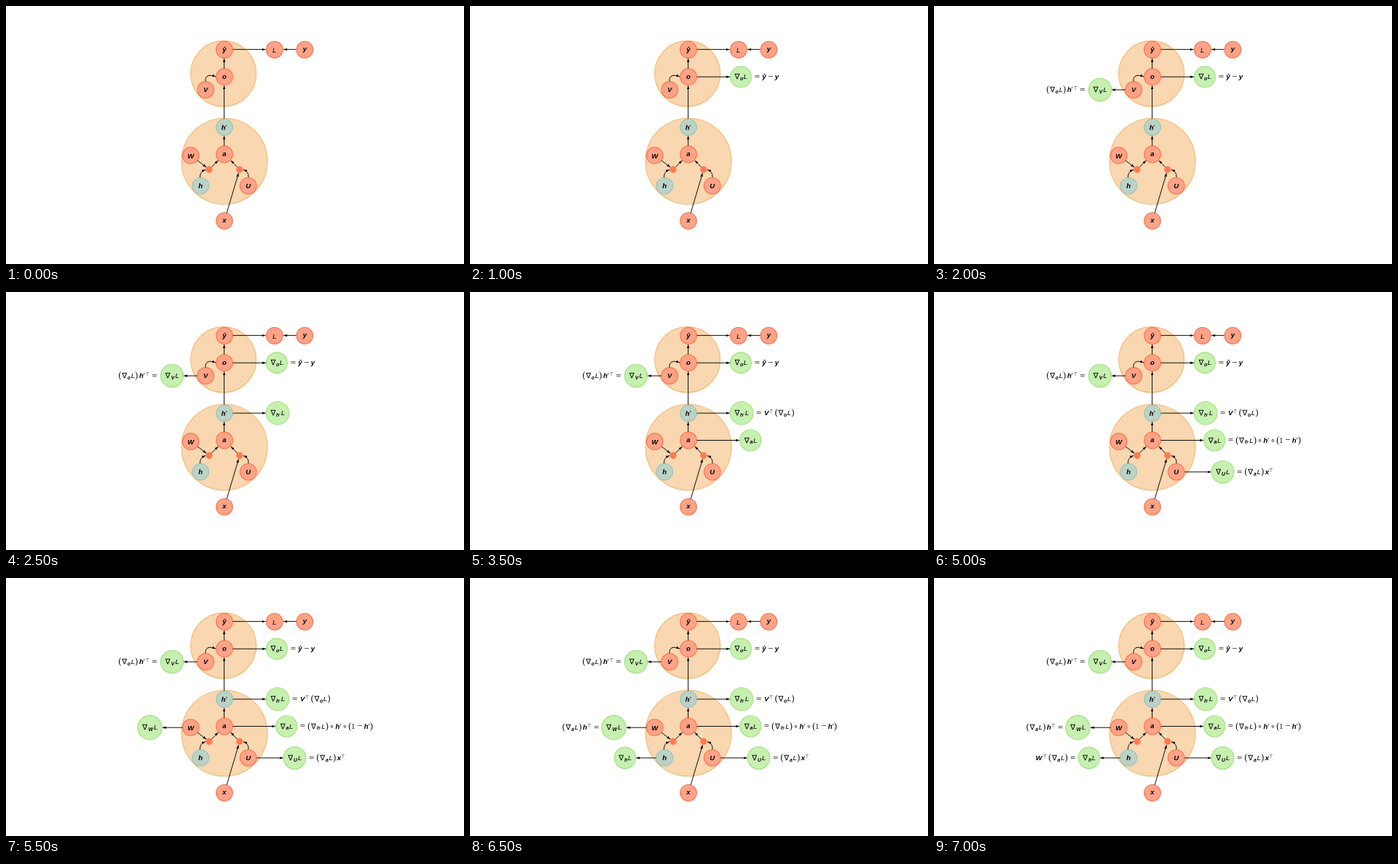
Write an HTML page that moves like this. It is 629 px wide and 354 px high and loops after 7.5 s.

```html
<!DOCTYPE html>
<html lang="en">
<head>
<meta charset="utf-8">
<title>Backpropagation graph</title>
<style>
html, body { margin: 0; height: 100%; overflow: hidden; background: #fff; }
svg { display: block; width: 629px; height: 354px; }
circle { stroke-width: 1.2; }
.cell { fill: #f9d7b0; stroke: #f3bd7c; }
.red { fill: #ffa388; stroke: #fb7850; }
.teal { fill: #bbd2c7; stroke: #a0c4b9; }
.green { fill: #c6f0b0; stroke: #a5e282; }
.dot { fill: #ff7a50; }
.arrow { fill: none; stroke: #000; stroke-width: .95; marker-end: url(#tip); }
text { text-anchor: middle; fill: #000; }
.bold { font: italic bold 9.5px "Liberation Sans", sans-serif; }
.light { font: italic 9.7px "Liberation Sans", sans-serif; }
.roman { font: 10.2px "Liberation Serif", serif; }
.paren { font: 11.6px "Liberation Serif", serif; }
.rel { font: 13px "Liberation Serif", serif; }
.sym { font: 10.3px "DejaVu Sans", sans-serif; }
.sup { font: 6.6px "DejaVu Sans", sans-serif; }
.sub { font-size: 6.9px; }
</style>
</head>
<body>
<svg id="stage" viewBox="0 0 629 354">
  <defs>
    <marker id="tip" markerUnits="userSpaceOnUse" markerWidth="6" markerHeight="4" refX="5" refY="2" orient="auto">
      <path d="M0 .2Q2.6 1.3 5.2 2Q2.6 2.7 0 3.8Z"/>
    </marker>
  </defs>
</svg>
<script>
const stage = document.getElementById('stage');
const EM = 10.2, STEP = 500, STEPS = 15;

// Glyph: [style, advance in em, baseline shift in px]
const glyphs = {
  '(': ['paren', .389, 0], ')': ['paren', .389, 0],
  '=': ['rel', .778, .7], '−': ['rel', .778, .7],
  '1': ['roman', .5, 0], '∇': ['sym', .833, 0], '∘': ['sym', .5, 0],
  '⊤': ['sup', .595, -3.2], '′': ['roman', .24, 0],
  L: ['light', .58, 0], V: ['bold', .73, 0], W: ['bold', 1.04, 0], U: ['bold', .74, 0],
  h: ['bold', .56, 0], a: ['bold', .525, 0], o: ['bold', .55, 0],
  x: ['bold', .5, 0], y: ['bold', .5, 0], 'ŷ': ['bold', .5, 0]
};
const spaces = { ' ': .278, '~': .222, ',': .167 };

// Sets a formula; braces hold a subscript. Returns its markup and width.
function typeset(src, x, y) {
  const start = x;
  let out = '', sub = false;
  for (const ch of src) {
    if (ch === '{') { sub = true; continue; }
    if (ch === '}') { sub = false; x += .05 * EM; continue; }
    if (ch in spaces) { x += spaces[ch] * EM; continue; }
    const [style, advance, shift] = glyphs[ch];
    const width = advance * EM * (sub ? .7 : 1);
    const cls = style + (sub ? ' sub' : '');
    out += `<text class="${cls}" x="${x + width / 2}" y="${y + shift + (sub ? 1.6 : 0)}">${ch}</text>`;
    x += width;
  }
  return { out, width: x - start };
}

const centred = (src, x, y) => typeset(src, x - typeset(src, 0, 0).width / 2, y).out;
const circle = (cls, x, y, r) => `<circle class="${cls}" cx="${x}" cy="${y}" r="${r}"/>`;
const arrow = d => `<path class="arrow" d="M${d}"/>`;
const node = (label, x, y, drop, cls = 'red') => circle(cls, x, y, 11.3) + centred(label, x, y + drop);

let art = circle('cell', 298.6, 92.9, 45) + circle('cell', 300, 213, 59);
art += [
  ['ŷ', 300, 60, 2.8], ['L', 368.8, 60, 3.5], ['y', 410.3, 60, 1.6],
  ['o', 300, 97.2, 2.5], ['V', 274.2, 115, 3.4], ['h′', 300, 166.3, 3.6, 'teal'],
  ['W', 253.7, 205.2, 3.5], ['a', 300, 203.5, 2.5], ['h', 267.2, 246.8, 3.4, 'teal'],
  ['U', 332.7, 246.8, 3.5], ['x', 300, 294.8, 2.4]
].map(n => node(...n)).join('');
art += circle('dot', 279, 224.3, 4.6) + circle('dot', 320.8, 224.3, 4.6);
art += [
  '311.6 59.6H356.5', '398.7 59.6H381', '299.6 85.6V72', '299.6 154.8V109.3', '299.6 192V178.3',
  '274 103.5C273 94 281 94 288 97', '263 212L275.2 221.2', '266.4 235.3C266.4 229 269 226.5 274 224.6',
  '282.3 221L291.4 212', '317.5 221L308.8 212', '333 235.3C333 229 331 226.5 326 224.6',
  '303.2 283.8L319.4 229.3'
].map(arrow).join('');

// Gradients: [variable, x, y, radius, arrow start, formula, formula x]
const grads = [
  ['o', 372, 97.2, 14.4, 311.6, '= ŷ~−~y', 390.5],
  ['V', 228, 115, 15.6, 262.8, '(∇{o}L),h′⊤ =', 154.5],
  ['h′', 373, 166.2, 15.7, 311.6, '= V⊤,(∇{o}L)', 392.7],
  ['a', 385.3, 203.5, 14.5, 311.6, '= (∇{h′}L)~∘~h′~∘~(1~−~h′)', 403.5],
  ['U', 396.5, 246.9, 15.4, 344.2, '= (∇{a}L),x⊤', 415.7],
  ['W', 197.6, 205.2, 16.6, 242.2, '(∇{a}L),h⊤ =', 126.8],
  ['h', 213, 246.9, 14.7, 255.7, 'W⊤,(∇{a}L) =', 138.8]
];
grads.forEach(([name, x, y, r, from, formula, fx], i) => {
  const end = x - Math.sign(x - from) * (r + .6);
  const body = arrow(`${from} ${y}H${end}`) + circle('green', x, y, r) + centred(`∇{${name}}L`, x, y + 3.2);
  art += `<g data-step="${2 * i + 1}">${body}</g>`;
  art += `<g data-step="${2 * i + 2}">${typeset(formula, fx, y + 3.2).out}</g>`;
});
stage.insertAdjacentHTML('beforeend', art);

const parts = stage.querySelectorAll('[data-step]');
function draw() {
  const step = Math.floor(performance.now() / STEP) % STEPS;
  for (const p of parts) p.style.display = p.dataset.step <= step ? '' : 'none';
  requestAnimationFrame(draw);
}
draw();
</script>
</body>
</html>
```
